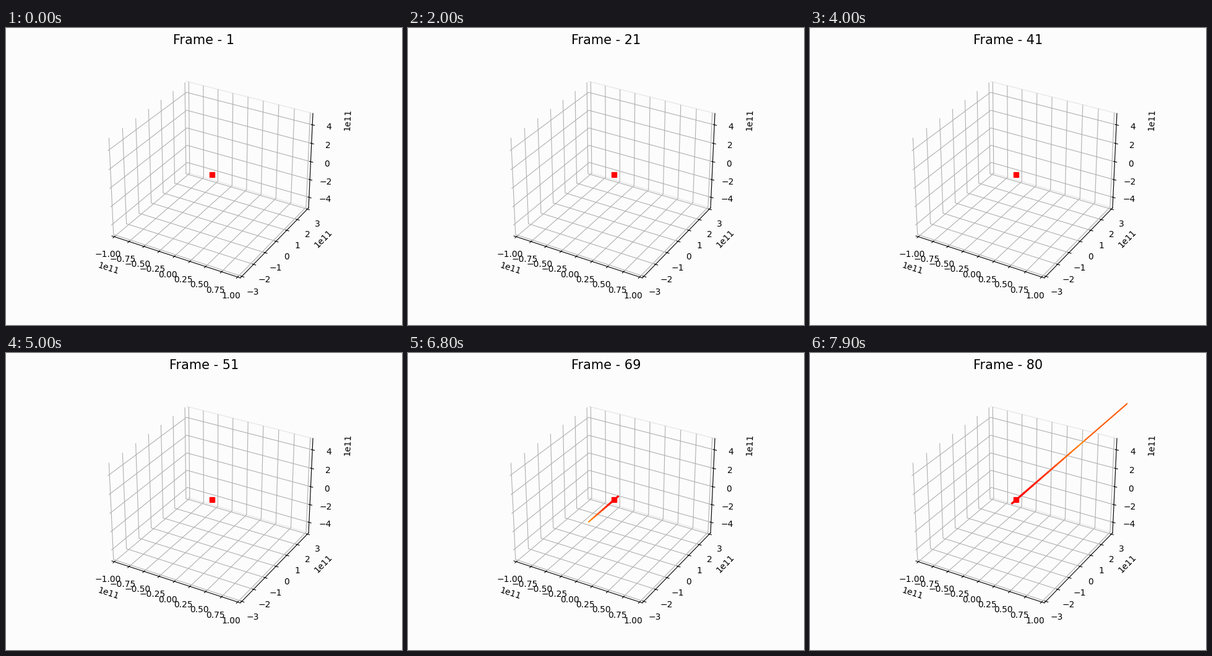
A matplotlib script that plays this animation: 640 px wide and 480 px high, repeating every 8 s.

```python
import numpy as np
import matplotlib.pyplot as plt
from matplotlib.animation import FuncAnimation

FRAMES, INTERVAL = 80, 100
UNIT = 1e11
PAPER = "#fcfcfc"
STEPS = 9        # colour bands along the beam
FULL = 6.36      # where the beam reaches its most orange tone

# Size of the unstable swing; its sign flips on every step
KEY_STEPS = [59, 60, 62, 71, 72, 73, 78, 79]
KEY_SWING = [0, 0.08, 0.43, 2.9, 6.45, 6.36, 8.6, 14]

fig = plt.figure(figsize=(6.4, 4.8), dpi=100, facecolor=PAPER)
ax = fig.add_subplot(projection="3d", facecolor=PAPER)
title = fig.suptitle("", fontsize=15)

ax.set_xlim(-UNIT, UNIT, view_margin=1 / 48)
ax.set_ylim(-3 * UNIT, 3 * UNIT, view_margin=1 / 48)
ax.set_zlim(-5 * UNIT, 5 * UNIT, view_margin=1 / 48)
ax.set_xticks(np.linspace(-1, 1, 9) * UNIT)
ax.set_yticks(np.arange(-3, 4) * UNIT)
ax.set_zticks(np.arange(-4, 5, 2) * UNIT)

for axis, edge in ((ax.xaxis, PAPER), (ax.yaxis, "#e8e8e8"), (ax.zaxis, PAPER)):
    axis.set_pane_color(PAPER)
    axis.pane.set_fill(False)
    axis.pane.set_edgecolor(edge)
ax.xaxis.pane.set_visible(False)
ax.zaxis.pane.set_visible(False)

ax.plot([0], [0], [0], "s", color="red", ms=6, zorder=5)


def beam(color, width, z):
    return ax.plot([], [], [], color=color, lw=width, zorder=z)[0]


outer = beam("#ff5a00", 1.5, 6)
bands = [beam((1, 0.5 * t, 0), 2.3 - 0.8 * t, 7) for t in np.linspace(0, 1, STEPS)]


def stretch(line, a, b):
    line.set_data_3d([0, 0], [a * UNIT, b * UNIT], [0, 0])


def draw(i):
    title.set_text(f"Frame - {i + 1}")
    swing = np.interp(i, KEY_STEPS, KEY_SWING)
    sign = 1 if i % 2 else -1
    shown = swing > 0
    reach = min(swing, FULL)
    knots = sign * np.linspace(0, reach, STEPS + 1)
    knots[0] = -sign * min(swing, 0.33)

    for line, a, b in zip(bands, knots, knots[1:]):
        stretch(line, a, b)
        line.set_visible(shown)
    stretch(outer, sign * reach, sign * swing)
    outer.set_visible(swing > FULL)
    return [title, outer, *bands]


anim = FuncAnimation(fig, draw, frames=FRAMES, interval=INTERVAL,
                     repeat=True, repeat_delay=0, blit=False)
plt.show()
```
